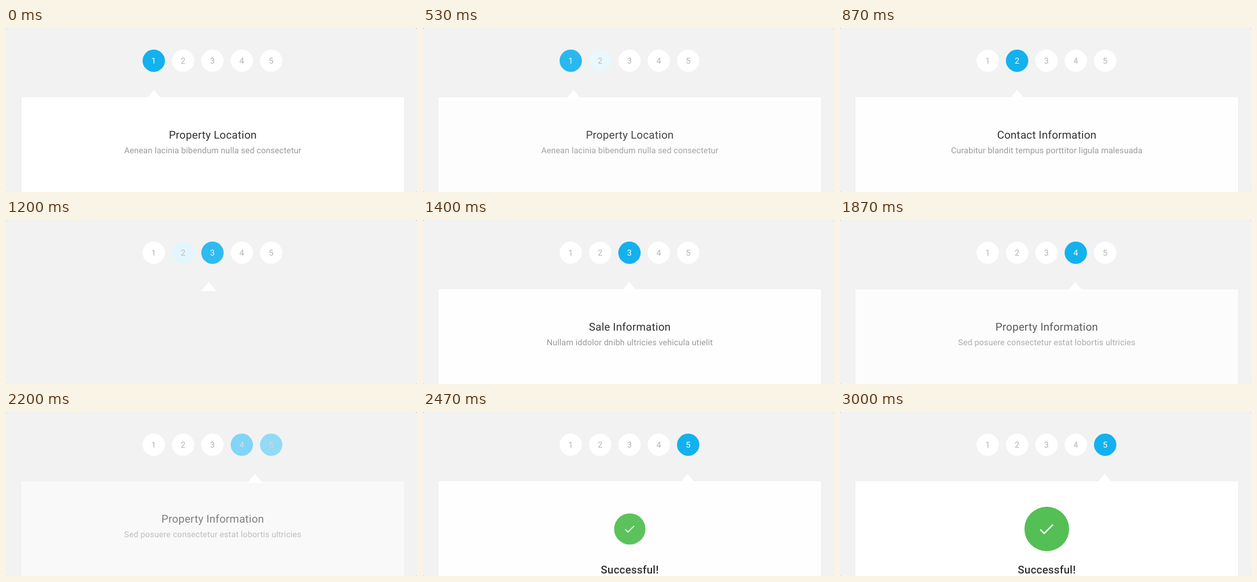
Write an HTML page that moves like this. It is 644 px wide and 258 px high and loops after 3.07 s.

```html
<!DOCTYPE html>
<html lang="en">
<head>
<meta charset="utf-8">
<title>Step wizard</title>
<style>
  html, body { margin: 0; width: 100%; height: 100%; overflow: hidden; background: #8a8a8a; }
  svg { display: block; width: 644px; height: 258px; }
  text { font-family: Roboto, Arial, sans-serif; text-anchor: middle; text-rendering: geometricPrecision; }
  .digit { font-size: 13px; }
  .title { font-size: 17px; letter-spacing: .2px; fill: #303030; }
  .strong { font-weight: 500; }
  .sub { font-size: 13px; letter-spacing: .11px; fill: #999; }
</style>
</head>
<body>
<svg viewBox="0 0 644 258">
  <rect width="644" height="258" rx="1.5" fill="#f2f2f2"/>
  <g id="dots"></g>
  <g id="panel">
    <rect x="23" y="109" width="602" height="160" fill="#000" opacity=".025"/>
    <rect x="24" y="109" width="600" height="160" fill="#fff"/>
    <g id="pages"></g>
  </g>
  <path id="arrow" d="M0 97.3L12 112H-12Z" fill="#fff"/>
</svg>
<script>
const LOOP = 3070, FRAMES = 46, FRAME = LOOP / FRAMES;
const FIRST = 7 * FRAME, PERIOD = 8 * FRAME;
const BLUE = [19, 177, 238], WHITE = [255, 255, 255], GREY = [179, 179, 179];

const PAGES = [
  ['Property Location', 'Aenean lacinia bibendum nulla sed consectetur'],
  ['Contact Information', 'Curabitur blandit tempus porttitor ligula malesuada'],
  ['Sale Information', 'Nullam iddolor dnibh ultricies vehicula utielit'],
  ['Property Information', 'Sed posuere consectetur estat lobortis ultricies']
];

const byId = id => document.getElementById(id);

function add(parent, tag, attrs, text) {
  const el = document.createElementNS('http://www.w3.org/2000/svg', tag);
  for (const name in attrs) el.setAttribute(name, attrs[name]);
  if (text) el.textContent = text;
  parent.appendChild(el);
  return el;
}

const dots = [0, 1, 2, 3, 4].map(i => {
  const x = 231.5 + 46 * i;
  return {
    disc: add(byId('dots'), 'circle', { cx: x, cy: 51.5, r: 17.5 }),
    digit: add(byId('dots'), 'text', { class: 'digit', x, y: 56 }, String(i + 1))
  };
});

const pages = PAGES.map(([title, sub]) => {
  const page = add(byId('pages'), 'g', {});
  add(page, 'text', { class: 'title', x: 324, y: 174 }, title);
  add(page, 'text', { class: 'sub', x: 324, y: 197 }, sub);
  return page;
});

const done = add(byId('pages'), 'g', {});
add(done, 'text', { class: 'title strong', x: 324, y: 254 }, 'Successful!');
const badge = add(done, 'g', {});
add(badge, 'circle', { r: 35, fill: '#54bf54' });
add(badge, 'path', { d: 'M-10.3 .8L-4 7L9.6 -6.8', fill: 'none', stroke: '#fff', 'stroke-width': 2.2 });
pages.push(done);

const clamp = x => Math.min(1, Math.max(0, x));
const span = (t, start, length) => clamp((t - start) / length);
const inOut = x => x < .5 ? 4 * x ** 3 : 1 - 4 * (1 - x) ** 3;
const mix = (a, b, p) => 'rgb(' + a.map((v, i) => Math.round(v + (b[i] - v) * p)) + ')';

function render(ms) {
  // The motion advances in 15 fps steps.
  const t = Math.floor((ms % LOOP + 6) / FRAME) % FRAMES * FRAME;
  const step = Math.min(4, Math.max(0, Math.floor((t - FIRST) / PERIOD + 1.01)));
  const u = step ? t - FIRST - (step - 1) * PERIOD : 1000;
  const move = inOut(span(u, -26, 327));

  dots.forEach(({ disc, digit }, i) => {
    const level = i === step ? move : i === step - 1 ? 1 - move : 0;
    disc.setAttribute('fill', mix(WHITE, BLUE, level));
    digit.setAttribute('fill', mix(GREY, WHITE, level));
  });

  const arrowX = 231.8 + 45.7 * (step ? step - 1 + move : 0);
  byId('arrow').setAttribute('transform', `translate(${arrowX})`);

  // The old page fades out before the new one fades in.
  const leaving = u < 199;
  const shown = leaving ? step - 1 : step;
  const alpha = leaving ? 1 - span(u, -30, 230) ** 2.6 : inOut(span(u, 190, 233));
  byId('panel').setAttribute('opacity', alpha);
  pages.forEach((page, i) => page.setAttribute('display', i === shown ? 'inline' : 'none'));

  const scale = .4 + .6 * inOut(span(u, 200, 400));
  badge.setAttribute('transform', `translate(324 184) scale(${scale})`);
  badge.setAttribute('opacity', inOut(span(u, 170, 300)));
}

const start = performance.now();
function tick() {
  render(performance.now() - start);
  requestAnimationFrame(tick);
}
tick();
</script>
</body>
</html>
```
